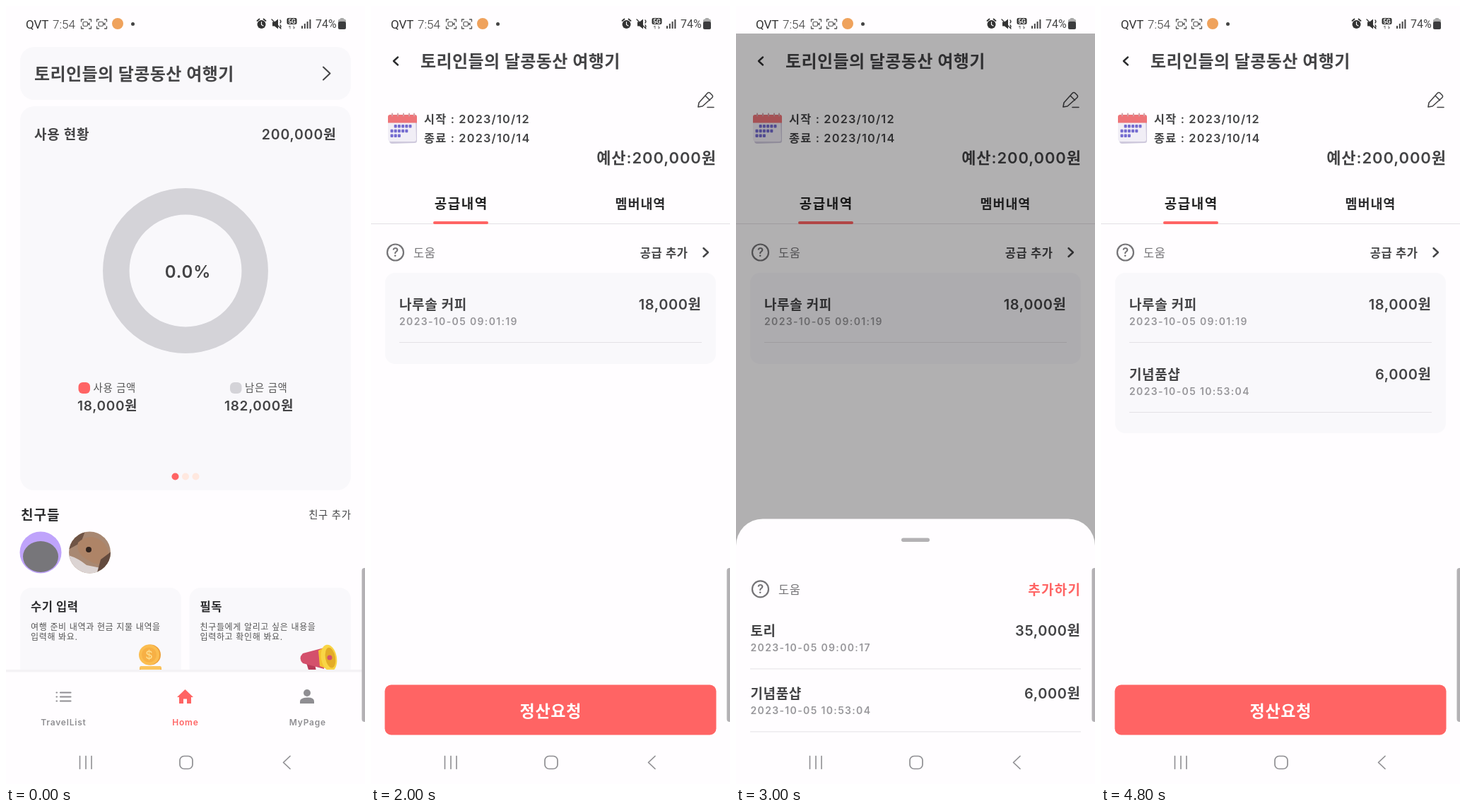
An HTML page that plays this animation: 508x1102 px, repeating every 5000 ms.

```html
<!DOCTYPE html>
<html lang="ko">
<head>
<meta charset="utf-8">
<title>Travel budget</title>
<style>
  html, body { margin: 0; width: 100%; height: 100%; overflow: hidden; background: #fffdff; }
  svg { display: block; width: 508px; height: 1102px; }
  text { font-family: Inter, 'Noto Sans CJK KR', 'Noto Sans CJK JP', sans-serif; }
  .status text { font-family: Roboto, sans-serif; }
</style>
</head>
<body>
<svg id="stage" viewBox="0 0 508 1102"></svg>
<script>
const BG = '#fffdff', RED = '#ff6464', INK = '#444446', GRAY = '#8f8e92', CARD = '#f9f8fb';
const TRIP = '토리인들의 달콩동산 여행기';

// Text is placed by the vertical centre of its glyphs.
function text(x, cy, str, size, weight = 600, color = INK, gap = 0.7, anchor = 'start') {
  const shift = { start: 0, middle: gap / 2, end: gap }[anchor];
  return `<text x="${x + shift}" y="${cy + size * 0.37}" font-size="${size}" font-weight="${weight}"
    fill="${color}" letter-spacing="${gap}" text-anchor="${anchor}">${str}</text>`;
}
const rect = (x, y, w, h, r, fill, extra = '') =>
  `<rect x="${x}" y="${y}" width="${w}" height="${h}" rx="${r}" fill="${fill}" ${extra}/>`;
const circle = (x, y, r, fill, extra = '') =>
  `<circle cx="${x}" cy="${y}" r="${r}" fill="${fill}" ${extra}/>`;
const line = (d, color, width, extra = '') =>
  `<path d="${d}" fill="none" stroke="${color}" stroke-width="${width}" stroke-linecap="round" stroke-linejoin="round" ${extra}/>`;
const shape = (d, fill) => `<path d="${d}" fill="${fill}"/>`;
const rule = (x1, x2, y) => `<path d="M${x1} ${y}H${x2}" stroke="#e3e1e5"/>`;

function statusBar() {
  const brackets = x => line(`M${x} 22v-3h3m8 0h3v3m0 7v3h-3m-8 0h-3v-3`, '#555', 1.3);
  const camera = (x, id) => `<g id="${id}">${rect(x + 2.5, 22.5, 6.5, 6, 1.5, 'none', 'stroke="#555" stroke-width="1.2"')}
    ${shape(`M${x + 9} 25.5l3 -2.5v5z`, '#555')}</g>`;
  const bars = [0, 1, 2, 3].map(i => rect(418 + i * 3.8, 28 - i * 3, 2, 4 + i * 3, 0.5, '#444')).join('');
  return `<g class="status">
    ${text(28, 25.5, 'QVT', 17, 400, '#333', 0)}
    ${text(66, 25.5, '7:54', 17, 300, '#333', 0)}
    ${brackets(106.5)}${camera(106.5, 'rec')}${brackets(128.5)}${camera(128.5, 'cam')}
    ${circle(158, 25, 8, '#efa25c')}${circle(179.5, 25.5, 2.5, '#444')}
    ${circle(361.5, 26, 6, '#333')}${line('M355.500 21l3 -2.500M367.500 21l-3 -2.500', '#333', 1.8)}
    ${line('M361.500 22.500v4l2.500 1.500', '#fff', 1.2)}
    ${shape('M377 22.500h3l5 -4v14l-5 -4h-3z', '#333')}${line('M376 19l13 13M388 20q2 2 0 4M388 27q2 2 0 4', '#333', 1.3)}
    ${rect(397.5, 17, 14, 9, 2, '#333')}${text(404.5, 21.6, '5G', 8.5, 700, '#fff', 0, 'middle')}
    ${line('M402 32v-4l-1.500 1.500M407 28v4l1.500 -1.500', '#888', 1.1)}
    ${bars}
    ${text(438, 25.5, '74%', 16, 400, '#444', 0)}
    ${rect(473, 17, 5, 3, 1, '#aaa')}${rect(470, 18.5, 11, 14.5, 2.5, '#aaa')}${rect(470, 22, 11, 11, 2.5, '#3c3c3e')}
  </g>`;
}

function systemNav() {
  return rect(0, 1044, 508, 58, 0, BG)
    + line('M104.5 1062.5v18M113 1062.5v18M121 1062.5v18', GRAY, 1.6)
    + rect(246, 1062.5, 18, 18, 6, 'none', `stroke="${GRAY}" stroke-width="1.7"`)
    + line('M402 1062.5l-9.5 9 9.5 9', GRAY, 1.7)
    + rect(503.5, 796, 9, 218, 4, '#b3b1b4');
}

function avatars() {
  return circle(49, 774, 29.5, '#bfa3fb')
    + `<ellipse cx="49" cy="780" rx="25" ry="22" fill="#77767a"/>`
    + `<clipPath id="round">${circle(118.5, 774, 29.5, '#000')}</clipPath><g clip-path="url(#round)">`
    + rect(88, 744, 61, 61, 0, '#a88872')
    + shape('M88 744h24l-6 16 -18 10z', '#6f5445')
    + shape('M102 760q18 -16 36 0q12 14 6 28q-14 6 -26 -2q-20 -10 -16 -26z', '#ae8467')
    + shape('M88 778q14 4 26 14l20 4 -4 10h-42z', '#dcd4d3')
    + shape('M128 806l6 -22 16 -12v34z', '#634a3e')
    + circle(117, 770, 4, '#33251f') + '</g>';
}

function coins() {
  const coin = y => rect(189, y, 31, 9, 4, '#e9982f') + rect(189, y, 31, 5, 2.5, '#fbc45c');
  return coin(943) + coin(935) + circle(204.5, 919, 14.5, '#eda03a') + circle(202.5, 919, 14.5, '#fbbd50')
    + circle(202.5, 919, 10.5, '#f7b045') + text(202.5, 919, '$', 16, 500, '#fddc8c', 0, 'middle');
}

function megaphone() {
  return shape('M424 927h12l4 20h-10z', '#b83a58') + shape('M420 917l30 -8v30l-30 -8q-7 -7 0 -14z', '#d4506c')
    + shape('M442 913l14 -8 4 36 -16 -6z', '#f4c22f')
    + `<g transform="rotate(-10 457 923.500)"><ellipse cx="457" cy="923.500" rx="11" ry="19" fill="#f9d545"/>
       <ellipse cx="459" cy="923.500" rx="7" ry="14.500" fill="#e3ac28"/></g>`
    + circle(458, 923, 3.5, '#d4506c');
}

function home() {
  const legend = (x, color, label, tx, amount) => rect(x, 533, 16.5, 16, 6, color)
    + text(x + 21, 541, label, 14.4, 400, '#555') + text(tx, 566, amount, 19);
  const tip = (x, w, title, a, b) => rect(x, 824, w, 140, 16, CARD) + text(x + 15, 851, title, 16.5, 700, '#2c2c2e', 0.6)
    + text(x + 15, 879.5, a, 12, 400, '#555', 0.65) + text(x + 15, 894, b, 12, 400, '#555', 0.65);
  const tab = (x, label, color) => text(x, 1015, label, 12, 600, color, 0.8, 'middle');
  return rect(20, 58, 468, 75, 20, CARD) + text(40, 96, TRIP, 24, 600, INK, 0.4)
    + line('M449 86.5l9.5 9 -9.5 9', INK, 2)
    + rect(20, 142, 468, 544, 20, CARD)
    + text(40, 181.5, '사용 현황', 19) + text(467, 181.5, '200,000원', 19.5, 600, INK, 0.8, 'end')
    + circle(254, 375, 98.2, 'none', 'stroke="#d4d3d8" stroke-width="37.5"')
    + text(257, 376, '0.0%', 24, 600, INK, 0.8, 'middle')
    + legend(102.5, RED, '사용 금액', 101, '18,000원')
    + legend(317, '#d4d3d8', '남은 금액', 309, '182,000원')
    + circle(239.5, 666.5, 5, RED) + circle(254, 666.5, 5, '#ffe8df') + circle(268.5, 666.5, 5, '#ffe8df')
    + text(21, 721, '친구들', 19, 700, '#2c2c2e', 1)
    + text(488, 721, '친구 추가', 14.4, 400, INK, 0.7, 'end')
    + avatars()
    + tip(20, 228, '수기 입력', '여행 준비 내역과 현금 지물 내역을', '입력해 봐요.')
    + tip(259.5, 228.5, '필독', '친구들에게 알리고 싶은 내용을', '입력하고 확인해 봐요.')
    + coins() + megaphone()
    + rect(0, 940, 508, 4, 0, '#f4f2f5') + rect(0, 943.5, 508, 160, 0, BG)
    + line('M77 972.5h14.5M77 978.5h14.5M77 984.5h14.5M71.5 972.5h.5M71.5 978.5h.5M71.5 984.5h.5', GRAY, 2.2)
    + shape('M242 979l11.5 -11 11.5 11h-3v9h-6v-6.5h-5v6.5h-6v-9z', RED)
    + circle(426, 973, 5, GRAY) + shape('M416 988v-3q0 -5 10 -5.500t10 5.500v3z', GRAY)
    + tab(81, 'TravelList', GRAY) + tab(253.5, 'Home', RED) + tab(426.5, 'MyPage', GRAY);
}

function calendar() {
  let days = '';
  [[1, 6], [0, 5], [0, 3]].forEach(([from, to], row) => {
    for (let col = from; col < to; col++)
      days += rect(27.5 + col * 5.2, 168 + row * 6.8, 4, 4.4, 1, '#746bd0');
  });
  const rings = [30, 38, 46, 54, 61].map(x => rect(x - 1, 151.5, 2, 5, 1, '#d3a0a6')).join('');
  return shape('M26 160h39v31q0 3 -3 3l-32 1q-4 0 -4 -4z', '#cfc9dd')
    + shape('M24 160h39l1 29q0 3 -3 3h-33q-4 0 -4 -4z', '#f1eef6')
    + shape('M24 157q0 -3 3 -3h35q3 0 3 3v8.500h-41z', '#ee7579') + rings + days;
}

const help = cy => circle(34.5, cy, 11.5, 'none', 'stroke="#757477" stroke-width="2.2"')
  + text(34.5, cy, '?', 17, 600, '#757477', 0, 'middle') + text(60, cy + 0.5, '도움', 16.5, 500, '#757477', 0.5);

const entry = (x, right, cy, name, date, amount) => text(x, cy, name, 19, 600, INK, 0.6)
  + text(x, cy + 24, date, 14, 600, '#98979b', 1.35) + text(right, cy, amount, 20, 600, INK, 0.6, 'end');

function detail() {
  const heading = (start, end, budget) => text(75, 160, '시작 : ' + start, 16.3, 600, INK, 1.2)
    + text(75, 186.5, '종료 : ' + end, 16.3, 600, INK, 1.2)
    + text(488, 215, '예산:' + budget, 22, 600, INK, 0.9, 'end');
  const button = (fill, color) => rect(19.5, 961.5, 469, 71, 9, fill)
    + text(254, 998, '정산요청', 23, 700, color, 0.7, 'middle');
  return rect(0, 39, 508, 1063, 0, BG)
    + line('M38 72.500l-6 5.500 6 5.500', '#2c2c2e', 2.4)
    + line('M463 143l1 -6 12 -13.500q2 -2 4 0l2.500 2.500q2 2 0 4l-13.500 12zM476 143.500h9M473 127l6.500 6.500', INK, 1.6)
    + calendar()
    + text(127, 280, '공급내역', 19, 700, '#222', 1.5, 'middle')
    + text(381, 280, '멤버내역', 18.5, 600, '#2c2c2e', 0.9, 'middle')
    + rule(0, 508, 308.5) + rect(88, 305, 78, 4, 2, RED)
    + help(349) + text(448, 350, '공급 추가', 16.5, 600, INK, 0.6, 'end')
    + line('M470.500 343l6.500 6 -6.500 6', INK, 2.4)
    + rect(20, 378, 468, 129, 14, CARD, 'id="list"') + rule(40, 468, 476.5)
    + `<g id="empty">${heading('', '', '0원')}${text(467, 423, '0원', 20, 600, INK, 0.5, 'end')}${button('#e0dfe1', '#a09ea1')}</g>`
    + `<g id="loaded">${text(70, 78, TRIP, 24, 600, INK, 0.4)}${heading('2023/10/12', '2023/10/14', '200,000원')}
       ${entry(40, 467, 423, '나루솔 커피', '2023-10-05 09:01:19', '18,000원')}${button(RED, '#fff')}</g>`
    + `<g id="added">${entry(40, 467, 522, '기념품샵', '2023-10-05 10:53:04', '6,000원')}${rule(40, 468, 575.5)}</g>`;
}

// Drawn with its top edge at 0.
function sheet() {
  return rect(0, 0, 508, 460, 38, BG) + rect(234, 27, 40, 5.5, 2.7, '#b3b1b4')
    + help(99.5)
    + `<ellipse id="ripple" cx="451.5" cy="99.500" rx="36" ry="26" fill="#fde7e9"/>`
    + text(487, 100.5, '추가하기', 19, 700, RED, 1.3, 'end')
    + rect(20, 223, 468, 79, 0, '#fad3d5', 'id="picked"')
    + entry(20.5, 487, 158.5, '토리', '2023-10-05 09:00:17', '35,000원') + rule(20, 488, 212.5)
    + entry(20.5, 487, 247.5, '기념품샵', '2023-10-05 10:53:04', '6,000원') + rule(20, 488, 301.5);
}

document.getElementById('stage').innerHTML = rect(0, 0, 508, 1102, 0, BG)
  + `<g id="home">${home()}</g><g id="detail">${detail()}</g>`
  + rect(0, 39, 508, 1063, 0, '#000', 'id="scrim"')
  + `<g id="sheet">${sheet()}</g>` + statusBar() + systemNav()
  + circle(0, 0, 13.5, '#fff', 'id="touch" fill-opacity=".6" stroke="#cfced6" stroke-width="2"');

const set = (id, name, value) => document.getElementById(id).setAttribute(name, value);
const show = (id, alpha) => set(id, 'opacity', +alpha);
const clamp = v => Math.min(1, Math.max(0, v));

// cubic-bezier(.4, 0, .2, 1)
function ease(p) {
  p = clamp(p);
  let lo = 0, hi = 1;
  for (let i = 0; i < 20; i++) {
    const u = (lo + hi) / 2, v = 1 - u;
    if (1.2 * u * v * v + 0.6 * u * u * v + u * u * u < p) lo = u; else hi = u;
  }
  return lo * lo * (3 - 2 * lo);
}

const taps = [[405, 353, 2600], [329, 985, 3600], [451, 816, 4200]];

function draw(t) {
  show('rec', (t - 250 + 1015) % 1015 >= 470);

  const fade = ease((t - 1150) / 700);
  show('home', 1 - fade);
  show('detail', fade);
  const loaded = t >= 1600, added = t >= 4400;
  show('empty', !loaded);
  show('loaded', loaded);
  show('added', added);
  set('list', 'height', added ? 227 : 129);

  const close = ease((t - 4330) / 150);
  const top = t < 2800 ? 1110 : 726 + 276 * Math.exp((2800 - t) / 31) + 384 * close;
  set('sheet', 'transform', `translate(0 ${top})`);
  show('scrim', 0.32 * ease((t - 2780) / 300) * (1 - close));
  show('picked', clamp((t - 3700) / 300));
  show('ripple', clamp((t - 4200) / 100));

  const tap = taps.find(([, , at]) => t >= at && t < at + 300);
  show('touch', tap ? (t < tap[2] + 200 ? 1 : 0.5) : 0);
  if (tap) set('touch', 'transform', `translate(${tap[0]} ${tap[1]})`);
}

// The screen advances ten times a second.
function tick() {
  draw(Math.floor(performance.now() % 5000 / 100) * 100);
  requestAnimationFrame(tick);
}
tick();
</script>
</body>
</html>
```
